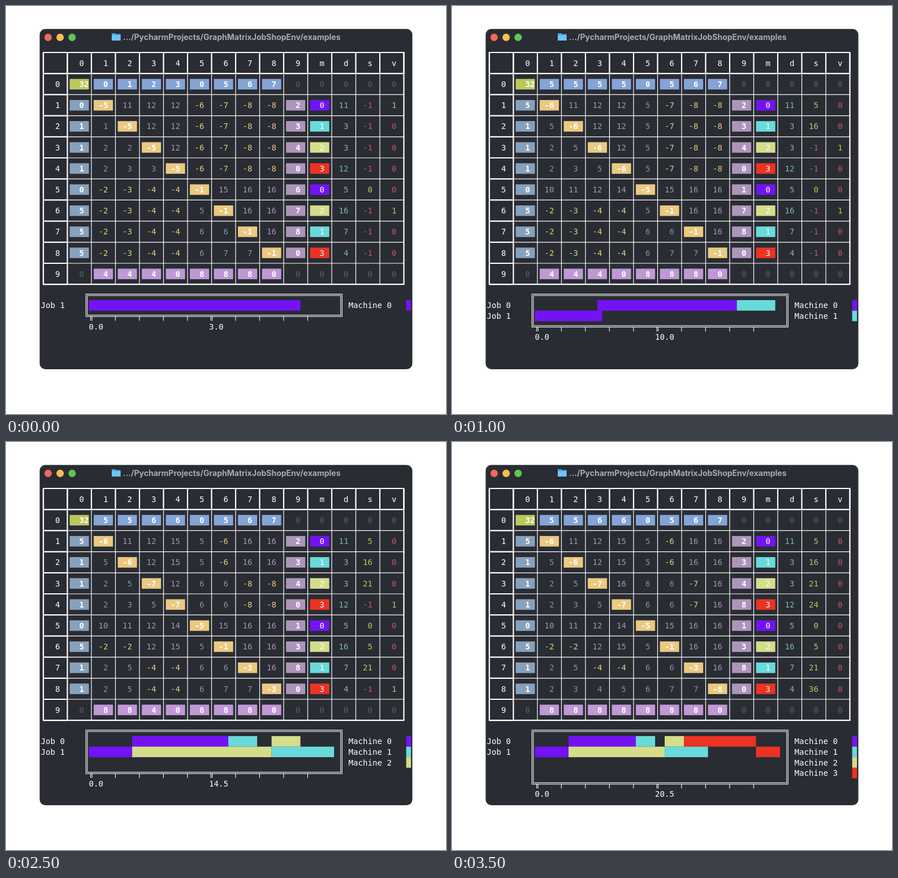
Write an HTML page with a canvas that moves like this. It is 778 px wide and 720 px high and loops after 4000 ms.

```html
<!DOCTYPE html>
<html lang="en">
<head>
<meta charset="utf-8">
<title>Job shop schedule</title>
<style>
  html, body { margin: 0; width: 100%; height: 100%; overflow: hidden; background: #fff; }
  canvas { display: block; }
</style>
</head>
<body>
<canvas id="stage" width="778" height="720"></canvas>
<script>
const ctx = document.getElementById('stage').getContext('2d');

// Terminal character grid
const CW = 8.5, CH = 18.6, COL = 5 * CW, ROW = 2 * CH;
const LEFT = 61.6, TABLE_X = 66, TABLE_Y = 82, CHART_X = 146.6, CHART_Y = 519;

const WHITE = '#fff', BG = '#292c33', RED = '#c4575d', GREEN = '#b9c65c', GREY = '#5c5f66';
const YELLOW = '#ebc980', BLUE = '#7f94aa', MAUVE = '#a991b5', TEAL = '#7fb4bb';
const MACHINE_COLORS = ['#7313f5', '#69dada', '#d5dd8a', '#ec3323'];

// Two jobs of four operations each, numbered 1 to 8
const OPS = [1, 2, 3, 4, 5, 6, 7, 8];
const MACHINE = [, 0, 1, 2, 3, 0, 2, 1, 3];
const DURATION = [, 11, 3, 3, 12, 5, 16, 7, 4];
const ORDER = [5, 1, 2, 6, 3, 7, 4, 8];
const jobOf = op => op > 4 ? 1 : 0;
const unique = list => [...new Set(list)].sort();

function rect(x, y, w, h, color) {
  ctx.fillStyle = color;
  ctx.fillRect(x, y, w, h);
}

function text(str, x, y, color = WHITE, bold = false) {
  ctx.font = `${bold ? 'bold ' : ''}14.12px "DejaVu Sans Mono", monospace`;
  ctx.fillStyle = color;
  ctx.fillText(str, x, y + 5);
}

function line(x1, y1, x2, y2, width) {
  ctx.lineWidth = width;
  ctx.strokeStyle = WHITE;
  ctx.beginPath();
  ctx.moveTo(x1, y1);
  ctx.lineTo(x2, y2);
  ctx.stroke();
}

function disc(x, y, r, color) {
  ctx.fillStyle = color;
  ctx.beginPath();
  ctx.arc(x, y, r, 0, 7);
  ctx.fill();
}

// Schedules the first `count` operations and closes the precedence relation.
function solve(count) {
  const start = {}, end = {}, done = ORDER.slice(0, count);
  const before = OPS.map(a => OPS.map(b => a < b && jobOf(a) === jobOf(b)));
  const precedes = (a, b) => before[a - 1][b - 1];
  done.forEach((op, i) => {
    for (const prev of done.slice(0, i))
      if (MACHINE[prev] === MACHINE[op]) before[prev - 1][op - 1] = true;
    for (const k of OPS) for (const a of OPS) for (const b of OPS)
      if (precedes(a, k) && precedes(k, b)) before[a - 1][b - 1] = true;
    start[op] = Math.max(0, ...done.slice(0, i).filter(p => precedes(p, op)).map(p => end[p]));
    end[op] = start[op] + DURATION[op];
  });
  return { start, end, done, precedes };
}

function cell(row, col, value, color, fill, bold = !!fill) {
  const x = TABLE_X + 4.1 + (col + 1) * COL, y = TABLE_Y + 18.8 + (row + 1) * ROW;
  if (fill) rect(x, y - CH / 2, 4 * CW, CH, fill);
  const str = String(value);
  const last = row === 0 && col === 0 ? 4 : 3;
  text(str, x + (last - str.length) * CW, y, color, bold);
}

function drawGrid() {
  const right = TABLE_X + 15 * COL, bottom = TABLE_Y + 11 * ROW;
  for (let i = 0; i <= 15; i++) {
    const x = TABLE_X + i * COL;
    line(x, TABLE_Y, x, bottom, i < 2 || i === 15 ? 2.2 : 1.2);
    line(x, TABLE_Y, x, TABLE_Y + ROW, 2.2);
  }
  for (let i = 0; i <= 11; i++) {
    const y = TABLE_Y + i * ROW;
    line(TABLE_X - 1, y, right + 1, y, i < 2 || i === 11 ? 2.2 : 1.2);
    line(TABLE_X, y, TABLE_X + COL, y, 2.2);
  }
  [...'0123456789mdsv'].forEach((name, i) => {
    cell(-1, i, name, WHITE);
    if (i < 10) cell(i, -1, i, WHITE);
  });
}

function drawMatrix({ start, done, precedes }) {
  cell(0, 0, 32, WHITE, '#bcc85c');
  cell(9, 0, 0, GREY);
  for (const row of [0, 9]) for (let col = 9; col < 14; col++) cell(row, col, 0, GREY);

  for (const op of OPS) {
    const preds = OPS.filter(o => precedes(o, op));
    const succs = OPS.filter(o => precedes(op, o));
    const open = OPS.filter(o => o !== op && !precedes(o, op) && !precedes(op, o));

    cell(0, op, preds.at(-1) ?? 0, WHITE, '#84a4d6');
    cell(op, 0, preds[0] ?? 0, WHITE, '#88a1ba');
    cell(9, op, succs.at(-1) ?? 0, WHITE, '#bf98d6');
    cell(op, 9, succs[0] ?? 0, WHITE, '#ad95ba');
    cell(op, op, -(open[0] ?? op), WHITE, YELLOW);

    // Each group is a linked list: an entry points to the next member, the last to itself.
    const link = (group, color, encode) =>
      group.forEach((o, i) => cell(op, o, encode(group[i + 1] ?? o), color));
    link(preds, BLUE, n => n);
    link(succs, MAUVE, n => n + 8);
    link(open, YELLOW, n => -n);

    const placed = op in start;
    const ready = !placed && OPS.find(o => jobOf(o) === jobOf(op) && !done.includes(o)) === op;
    cell(op, 10, MACHINE[op], WHITE, MACHINE_COLORS[MACHINE[op]], false);
    cell(op, 11, DURATION[op], TEAL);
    cell(op, 12, placed ? start[op] : -1, placed ? GREEN : RED);
    cell(op, 13, +ready, ready ? GREEN : RED);
  }
}

function drawChart({ start, end, done }) {
  const jobs = unique(done.map(jobOf)), machines = unique(done.map(op => MACHINE[op]));
  const height = Math.max(jobs.length, machines.length) * CH;
  const span = Math.max(...Object.values(end)) + 1;
  const column = t => Math.floor(1 + 52 * t / span);
  const rowY = i => CHART_Y + (i + .5) * CH;

  ctx.strokeStyle = WHITE;
  ctx.lineWidth = 1.1;
  ctx.strokeRect(141.3, CHART_Y - 10.6, 453, height + 21);
  ctx.strokeRect(143.8, CHART_Y - 8.1, 448, height + 16);

  jobs.forEach((job, i) => {
    text('Job ' + job, LEFT, rowY(i));
    for (const op of done.filter(o => jobOf(o) === job)) {
      const from = column(start[op] - 1e-6), to = column(end[op]);
      rect(CHART_X + from * CW, CHART_Y + i * CH, (to - from) * CW, CH, MACHINE_COLORS[MACHINE[op]]);
    }
  });
  machines.forEach((m, i) => {
    text('Machine ' + m, LEFT + 64 * CW, rowY(i));
    rect(LEFT + 76 * CW, CHART_Y + i * CH, CW, CH, MACHINE_COLORS[m]);
  });

  const axisY = CHART_Y + height + 10;
  for (let i = 0; i < 10; i++) {
    const x = CHART_X + 4.3 + i * COL;
    const offsets = i % 5 ? [0] : [-1.2, 1.2];
    for (const dx of offsets) line(x + dx, axisY, x + dx, axisY + 8, 1.1);
  }
  text('0.0', CHART_X, axisY + 18);
  text((span / 2).toFixed(1), CHART_X + 25 * CW, axisY + 18);
}

function drawWindow() {
  rect(0, 0, 778, 720, WHITE);
  ctx.fillStyle = BG;
  ctx.beginPath();
  ctx.roundRect(59.5, 40.5, 659, 600.5, 10);
  ctx.fill();
  ['#ed6a5e', '#f5bf4f', '#61c554'].forEach((color, i) => disc(74.5 + i * 21.2, 55.3, 6.5, color));

  rect(187, 48, 7, 4, '#3f9fd8');
  rect(187, 49.5, 15.5, 11.5, '#4aa9e0');
  rect(187, 51.5, 15.5, 9.5, '#6fc5f1');
  ctx.font = '700 14px Inter, sans-serif';
  ctx.fillStyle = '#a9abaf';
  ctx.fillText('.../PycharmProjects/GraphMatrixJobShopEnv/examples', 207, 60);
}

const schedules = ORDER.map((_, i) => solve(i + 1));

function render() {
  const schedule = schedules[Math.floor(performance.now() % 4000 / 500)];
  drawWindow();
  drawGrid();
  drawMatrix(schedule);
  drawChart(schedule);
  requestAnimationFrame(render);
}
render();
</script>
</body>
</html>
```
